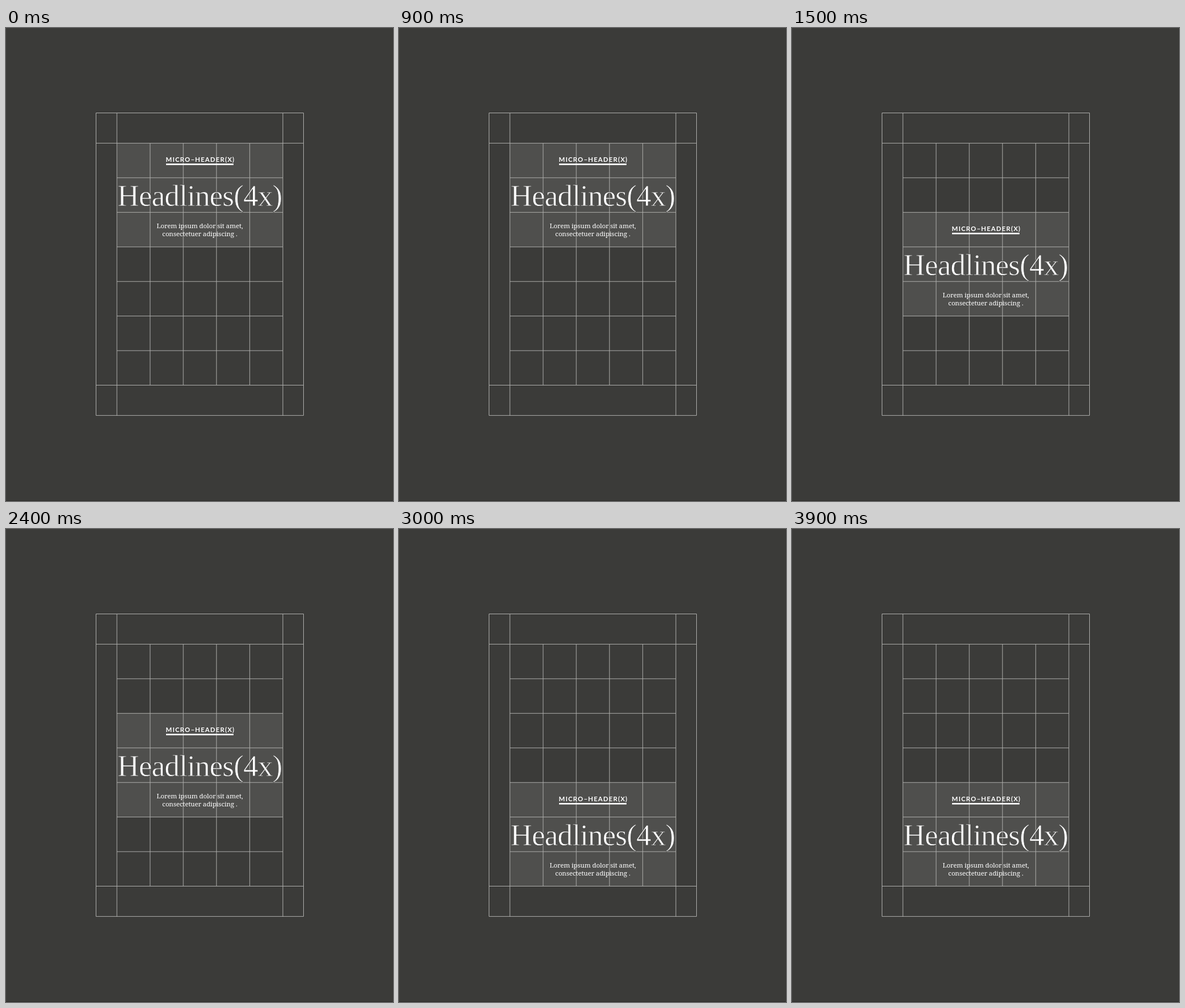
An HTML page that plays this animation: 677 by 827 pixels, repeating every 4500 ms.

```html
<!DOCTYPE html>
<html lang="en">
<head>
<meta charset="utf-8">
<title>Layout grid</title>
<style>
  html, body { margin: 0; width: 100%; height: 100%; overflow: hidden; background: #3b3b39; }
  svg { display: block; width: 677px; height: 827px; }
  .lines { fill: none; stroke: #aeaeac; stroke-width: 1; }
  .edge { fill: none; stroke: #2a2a28; stroke-width: 1; }
  .side { stroke: #333331; }
  .band { fill: #4f4f4d; }
  .copy { fill: #fff; text-anchor: middle; }
  .micro { font: 700 11.3px Lato, sans-serif; letter-spacing: 1.15px; }
  /* the band-coloured outline lightens the strokes */
  .head { font: 53px "Liberation Serif", serif; letter-spacing: -.95px; stroke: #4f4f4d; stroke-width: .9; }
  .body { font: 11.5px "Noto Serif", serif; letter-spacing: -.14px; }
  .band, .copy { animation: drop 4.5s step-end infinite; }
  @keyframes drop {
    0% { transform: translateY(0); }
    33.3333% { transform: translateY(121px); }
    66.6667% { transform: translateY(242px); }
  }
</style>
</head>
<body>
<svg viewBox="0 0 677 827">
  <rect class="band" x="194" y="201" width="290" height="181.5"/>
  <g class="lines">
    <path d="M157.5 148.5H520.5V677.4H157.5Z"/>
    <path d="M157 201.4H521M157 624.5H521M194 148V678M484.3 148V678"/>
    <path d="M252.1 201V625M310.1 201V625M368.2 201V625M426.3 201V625"/>
    <path d="M194 261.85H484M194 322.3H484M194 382.75H484M194 443.2H484M194 503.6H484M194 564.1H484"/>
  </g>
  <path class="edge" d="M0 826.5H677"/>
  <path class="edge side" d="M676.5 0V827"/>
  <g class="copy">
    <text class="micro" x="340" y="233.5">MICRO–HEADER(X)</text>
    <rect x="280" y="237" width="118" height="2.6"/>
    <text class="head" x="338.8" y="311">Headlines(4x)</text>
    <text class="body" x="339" y="349.5">Lorem ipsum dolor sit amet,</text>
    <text class="body" x="339" y="363.8">consectetuer adipiscing .</text>
  </g>
</svg>
</body>
</html>
```
